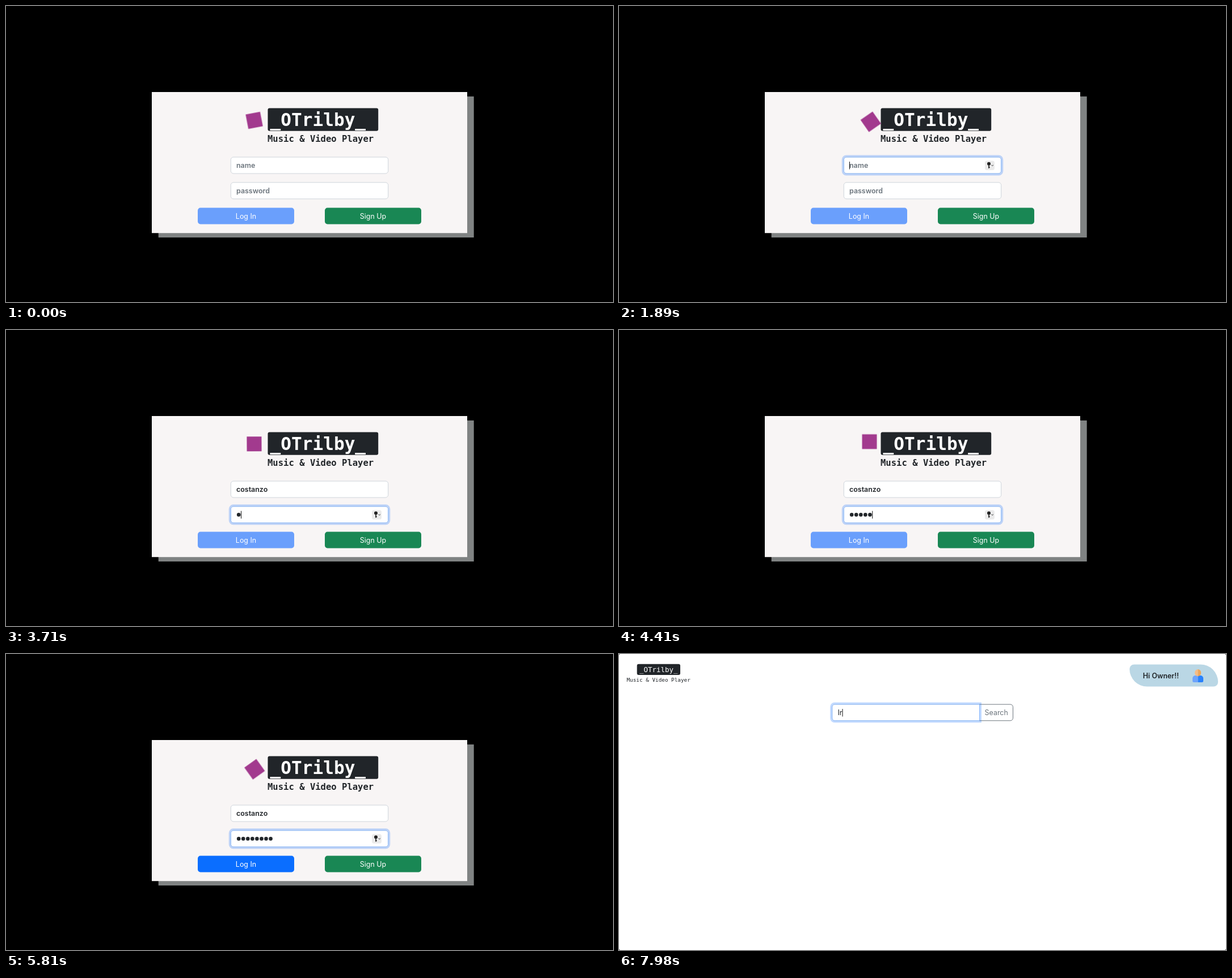
Write an HTML page that moves like this. It is 1070 px wide and 523 px high and loops after 8000 ms.

```html
<!DOCTYPE html>
<html lang="en">
<head>
<meta charset="utf-8">
<title>Player login</title>
<style>
  html, body { margin: 0; width: 100%; height: 100%; overflow: hidden; background: #000; }
  svg { display: block; width: 1070px; height: 523px; }
  text { font: 400 12.45px Inter, "Open Sans", sans-serif; fill: #212529; white-space: pre; }
  .semi { font-weight: 600; }
  .hint { fill: #6c757d; }
  .mid { text-anchor: middle; }
  .white { fill: #fff; }
  .mono { font-family: "DejaVu Sans Mono", "Liberation Mono", monospace; }
  .title { font-size: 31.1px; font-weight: 700; }
  .sub { font-size: 15.56px; font-weight: 700; }
  .small { font-size: 9.34px; }
  .box { fill: #fff; stroke: #ced4da; }
  .ring { fill: none; stroke: #0d6efd; stroke-opacity: .25; stroke-width: 3; }
  .lit { fill: none; stroke: #86b7fe; }
  .caret { fill: #111; }
  #mark { transform-box: view-box; transform-origin: 441.5px 201.3px; }
</style>
</head>
<body>
<svg viewBox="0 0 1070 523">
  <defs>
    <g id="key">
      <rect x="645" y="-8" width="17" height="16.5" rx="3.5" fill="#ebebeb"/>
      <circle cx="652" cy="-2.7" r="3" fill="#222"/>
      <path d="M652 0V5.2M652 3.6h1.6" fill="none" stroke="#222" stroke-width="1.7"/>
      <path d="M656.4 -.7l1.8 1.8 1.8-1.8" fill="none" stroke="#333"/>
    </g>
  </defs>

  <g id="login">
    <rect x="268.7" y="159.8" width="556" height="249.2" fill="#808383"/>
    <rect x="257" y="152" width="556" height="249.2" fill="#f8f5f5"/>
    <rect x="461.5" y="180.5" width="194.7" height="40.2" rx="3" fill="#212529"/>
    <text class="mono title white" x="465.6" y="211.5">_OTrilby_</text>
    <text class="mono sub" x="461" y="240">Music &amp; Video Player</text>
    <rect id="mark" x="424.5" y="188.3" width="26" height="26" fill="#a23a8e"/>

    <g id="name">
      <rect class="box" x="396.3" y="267" width="277.4" height="29" rx="4.7"/>
      <g class="focus">
        <rect class="ring" x="394.3" y="265" width="281.4" height="33" rx="6.5"/>
        <rect class="lit" x="396.3" y="267" width="277.4" height="29" rx="4.7"/>
        <use href="#key" y="281.5"/>
      </g>
      <text class="semi entry" x="406" y="286"></text>
      <rect class="caret" y="275" width="1" height="13.5"/>
    </g>

    <g id="pass">
      <rect class="box" x="396.3" y="311.8" width="277.4" height="29" rx="4.7"/>
      <g class="focus">
        <rect class="ring" x="394.3" y="309.8" width="281.4" height="33" rx="6.5"/>
        <rect class="lit" x="396.3" y="311.8" width="277.4" height="29" rx="4.7"/>
        <use href="#key" y="326.3"/>
      </g>
      <text class="semi entry" x="406" y="331"></text>
      <g id="dots" fill="#212529"></g>
      <rect class="caret" y="319.7" width="1" height="13.5"/>
    </g>

    <rect id="enter" x="338" y="356.5" width="170" height="29" rx="4.7"/>
    <text class="mid white" x="423" y="376">Log In</text>
    <rect x="562" y="356.5" width="170" height="29" rx="4.7" fill="#198754"/>
    <text class="mid white" x="647" y="376">Sign Up</text>
  </g>

  <g id="home">
    <rect width="1070" height="523" rx="2" fill="#fff"/>
    <rect x="31.7" y="17.7" width="76.3" height="19.4" rx="3" fill="#212529"/>
    <text class="mono white" x="36" y="32">_OTrilby_</text>
    <text class="mono small" x="13.5" y="49.3">Music &amp; Video Player</text>

    <path d="M908 18.5H1025a31 31 0 0 1 31 31a8 8 0 0 1-8 8H931a31 31 0 0 1-31-31a8 8 0 0 1 8-8z" fill="#bad7e5"/>
    <text class="semi" x="923.5" y="43.2">Hi Owner!!</text>
    <path d="M1020.5 38H1016a5 5 0 0 0-5 5v4.5a2.5 2.5 0 0 0 2.5 2.5h7z" fill="#6ea4fb"/>
    <path d="M1020.5 38H1025a5 5 0 0 1 5 5v4.5a2.5 2.5 0 0 1-2.5 2.5h-7z" fill="#2a82fb"/>
    <path d="M1020.5 27a5.5 6.2 0 0 0 0 12.4z" fill="#f6bd86"/>
    <path d="M1020.5 27a5.5 6.2 0 0 1 0 12.4z" fill="#efa65a"/>

    <path d="M635.5 89H689.8a4.7 4.7 0 0 1 4.7 4.7v19.4a4.7 4.7 0 0 1-4.7 4.7H635.5z" fill="#fff" stroke="#6c757d"/>
    <text class="mid hint" x="665.2" y="108">Search</text>
    <g id="search">
      <path class="box" d="M635.5 89H380.4a4.7 4.7 0 0 0-4.7 4.7v19.4a4.7 4.7 0 0 0 4.7 4.7H635.5"/>
      <path d="M635.5 88.5v29.8" stroke="#6c757d"/>
      <g class="focus">
        <path class="ring" d="M637.5 87H380.2a6.5 6.5 0 0 0-6.5 6.5v19.8a6.5 6.5 0 0 0 6.5 6.5H637.5z"/>
        <path class="lit" d="M635.5 89H380.4a4.7 4.7 0 0 0-4.7 4.7v19.4a4.7 4.7 0 0 0 4.7 4.7H635.5z"/>
      </g>
      <text class="entry" x="385.5" y="108"></text>
      <rect class="caret" y="97" width="1" height="13.5"/>
    </g>
  </g>
</svg>

<script>
const LOOP = 8000, STEP = 70, FADE = 150, BLINK = 560;
const HOME_AT = 5880, READY_AT = 4830, DOT = 8.05;
const $ = id => document.getElementById(id);

// Focus span and key press times of each field, in ms.
const fields = [
  { id: 'name', hint: 'name', word: 'costanzo', on: 1470, off: 3300,
    keys: [2030, 2170, 2310, 2450, 2660, 2800, 2940, 3080] },
  { id: 'pass', hint: 'password', dots: true, on: 3300, off: LOOP,
    keys: [3640, 3850, 4060, 4200, 4340, 4480, 4690, READY_AT] },
  { id: 'search', hint: 'artist', word: 'Ir', on: 6965, off: LOOP, keys: [7700, 7980] }
];

for (const f of fields) {
  const root = $(f.id);
  f.entry = root.querySelector('.entry');
  f.focus = root.querySelector('.focus');
  f.caret = root.querySelector('.caret');
}

const dots = fields[1].keys.map((_, i) => {
  const c = document.createElementNS('http://www.w3.org/2000/svg', 'circle');
  c.setAttribute('cx', 410.2 + i * DOT);
  c.setAttribute('cy', 326.4);
  c.setAttribute('r', 3.3);
  return $('dots').appendChild(c);
});

const spin = $('mark').animate(
  [{ transform: 'rotate(0deg)', easing: 'ease' }, { transform: 'rotate(360deg)' }],
  { duration: 3150, iterations: Infinity });
spin.pause();

const clamp = v => Math.max(0, Math.min(1, v));
const show = (el, on) => { el.style.display = on ? '' : 'none'; };

function drawField(f, t) {
  const pressed = f.keys.filter(k => k <= t);
  const n = pressed.length;
  f.focus.style.opacity = clamp((t - f.on) / FADE) - clamp((t - f.off) / FADE);
  f.entry.textContent = n ? (f.dots ? '' : f.word.slice(0, n)) : f.hint;
  f.entry.classList.toggle('hint', !n);

  const idle = t - (n ? pressed[n - 1] : f.on);
  const active = t >= f.on && t < f.off;
  show(f.caret, active && idle % (2 * BLINK) < BLINK);
  const width = !n ? 0 : f.dots ? n * DOT : f.entry.getComputedTextLength();
  f.caret.setAttribute('x', Number(f.entry.getAttribute('x')) + width);
  if (f.dots) dots.forEach((d, i) => show(d, i < n));
}

function draw(t) {
  const home = t >= HOME_AT;
  show($('login'), !home);
  show($('home'), home);
  spin.currentTime = t + 2457;
  $('enter').setAttribute('fill', t >= READY_AT ? '#0a6eff' : '#6a9ffc');
  for (const f of fields) if ((f.id === 'search') === home) drawField(f, t);
}

const start = performance.now();
function tick() {
  const t = (performance.now() - start) % LOOP;
  draw(Math.floor(t / STEP) * STEP);
  requestAnimationFrame(tick);
}
tick();
</script>
</body>
</html>
```
